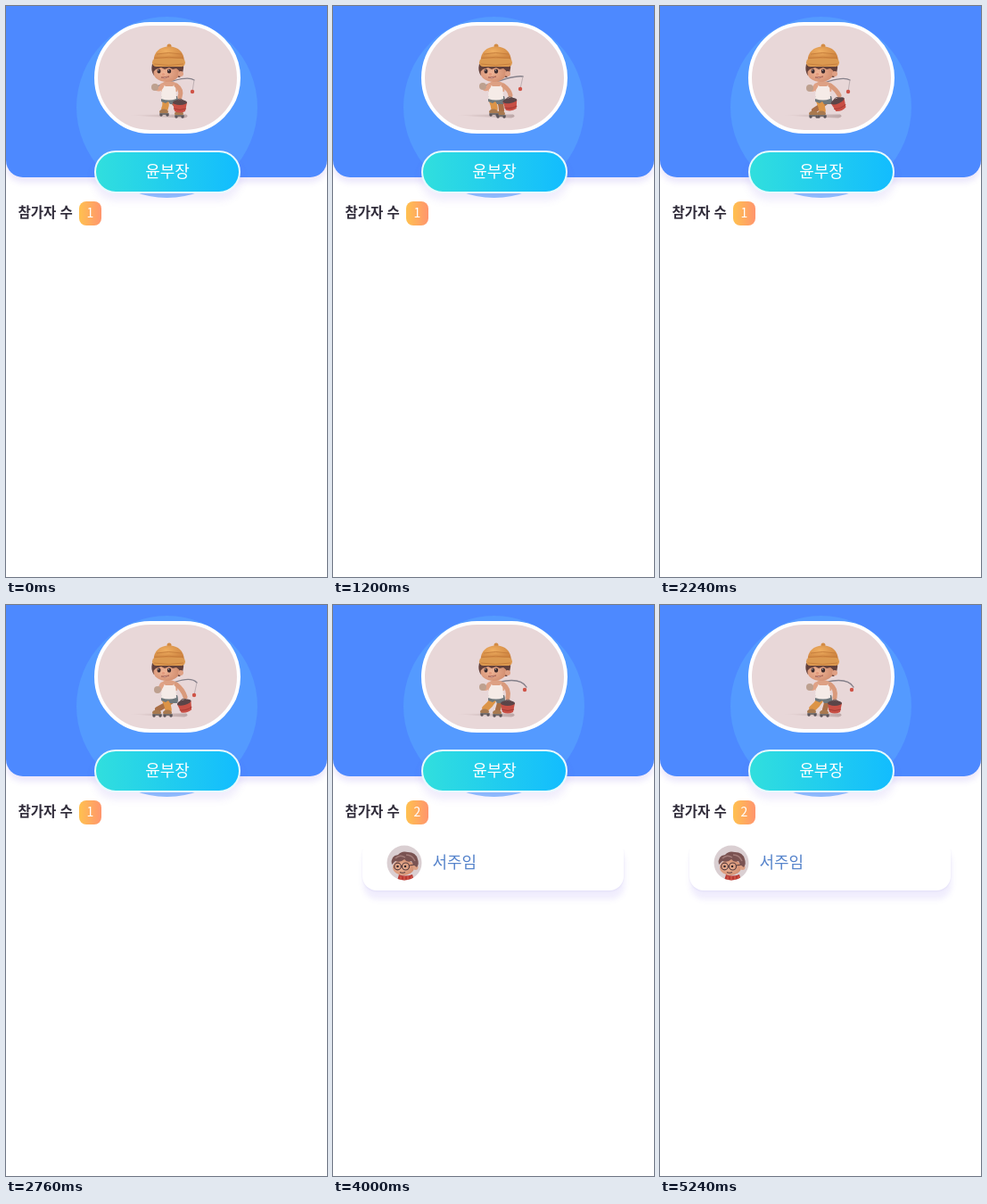
Write an HTML page that moves like this. It is 360x640 px and loops after 5280 ms.

```html
<!DOCTYPE html>
<html lang="ko">
<head>
<meta charset="utf-8">
<title>참가자 목록</title>
<style>
  html, body { margin: 0; width: 100%; height: 100%; overflow: hidden; background: #fff; }
  .stage {
    position: relative; width: 360px; height: 640px; overflow: hidden; background: #fff;
    font-family: "Noto Sans CJK KR", "Noto Sans CJK", "Noto Sans", sans-serif;
  }
  .stage > * { position: absolute; box-sizing: border-box; }
  .header {
    left: 0; top: -20px; width: 360px; height: 211.5px; border-radius: 0 0 19px 19px;
    background: #4d89ff; box-shadow: 0 6px 6px rgba(105, 80, 225, .13);
  }
  .disc { left: 79px; top: 12px; width: 203px; height: 203px; border-radius: 50%; background: rgba(88, 163, 255, .65); }
  .portrait {
    left: 99px; top: 18px; width: 164px; height: 125px; border: 4px solid #fff;
    border-radius: 62.5px; background: #e8d7d8;
  }
  .tag {
    left: 99px; top: 162px; width: 164px; height: 48px; border: 2px solid #e6fafd;
    border-radius: 24px; background: linear-gradient(90deg, #31dfdd, #12bcff) border-box;
    box-shadow: 0 7px 8px 1px rgba(105, 80, 225, .1);
  }
  .badge {
    left: 82px; top: 218.5px; width: 24.5px; height: 27.5px; border-radius: 8px;
    background: linear-gradient(90deg, #ffc150, #ff956d);
  }
  .card {
    left: 33px; top: 262px; width: 293px; height: 58px; border-radius: 16px; background: #fff;
    box-shadow: 0 1px 2px rgba(80, 70, 180, .08), 1px 10px 6px rgba(105, 80, 235, .1);
    clip-path: inset(12px -12px -24px -12px);
  }
  svg { left: 0; top: 0; }
</style>
</head>
<body>
<div class="stage">
  <div class="header"></div>
  <div class="disc"></div>
  <div class="portrait"></div>
  <div class="tag"></div>
  <div class="badge"></div>
  <div class="card guest"></div>

  <svg width="360" height="640" viewBox="0 0 360 640">
    <defs>
      <radialGradient id="wool" cx=".4" cy=".3" r=".75">
        <stop offset="0" stop-color="#efae60"/><stop offset="1" stop-color="#c97d3b"/>
      </radialGradient>
      <radialGradient id="skin" cx=".4" cy=".5" r=".65">
        <stop offset="0" stop-color="#efb597"/><stop offset="1" stop-color="#cf8a6c"/>
      </radialGradient>
      <linearGradient id="ground">
        <stop offset="0" stop-color="#b39a9a" stop-opacity="0"/><stop offset="1" stop-color="#8f7676" stop-opacity=".5"/>
      </linearGradient>
      <clipPath id="round"><circle cx="80" cy="289" r="19.5"/></clipPath>
      <g id="boot">
        <ellipse cx="-1" cy="-.5" rx="5" ry="3" fill="#a8794f"/>
        <rect x="-6" y="1" width="11" height="2" rx="1" fill="#77706f"/>
        <circle cx="-4" cy="3.2" r="1.5" fill="#5b545a"/>
        <circle cx="3" cy="3.2" r="1.5" fill="#5b545a"/>
      </g>
    </defs>

    <!-- walking figure -->
    <path d="M137 122L202 121.500Q206 124 200 125.500L160 124Z" fill="url(#ground)"/>
    <g fill="none" stroke-linecap="round">
      <path id="rod" stroke="#85808a" stroke-width="1.3"/>
      <path id="line" stroke="#b3a5a9" stroke-width=".8"/>
      <path id="farLeg" stroke="#a96e46" stroke-width="6"/>
    </g>
    <circle id="ball" r="2.2" fill="#cf5347"/>
    <use href="#boot" id="farBoot"/>
    <path id="nearLeg" fill="none" stroke="#dc9447" stroke-width="7.500" stroke-linecap="round"/>
    <use href="#boot" id="nearBoot"/>
    <path d="M174 101H192Q194 106 192 110L184 110 182 107 179 109 174 107Z" fill="#6f787c"/>
    <path d="M173 89Q176 84 183 84Q190 84 193 90L192 96H174Z" fill="#dda083"/>
    <path d="M175 87L179 90H187L190 87 191 104Q183 107 174 104Z" fill="#f5ebe7"/>
    <path id="farArm" fill="none" stroke="#d99a7c" stroke-width="5" stroke-linecap="round"/>
    <g id="bucket">
      <path d="M-6 -4Q0 -14 6 -4" fill="none" stroke="#6c5754" stroke-width="1"/>
      <path d="M-8 -5H8L6 5Q0 8 -6 5Z" fill="#c84f45"/>
      <path d="M-7 2Q0 5 7 2" fill="none" stroke="#a73a34" stroke-width="1"/>
      <ellipse cy="-5" rx="8" ry="3" fill="#5a4548"/>
    </g>

    <path d="M164 65Q162 73 166 78L195 80Q200 74 199 64Z" fill="#62403b"/>
    <ellipse cx="180" cy="75" rx="14.500" ry="10" fill="url(#skin)"/>
    <circle cx="196" cy="76" r="3" fill="#dfa084"/>
    <path d="M165 66Q181 64 199 67L195 73 191 70 187 71 183 69 178 71 174 69 168 71 166 73Z" fill="#62403b"/>
    <g fill="#38282b">
      <ellipse cx="171.500" cy="73" rx="2" ry="2.600"/><ellipse cx="183" cy="73" rx="2.200" ry="2.600"/>
    </g>
    <circle cx="171" cy="72" r=".6" fill="#fff"/><circle cx="182.500" cy="72" r=".6" fill="#fff"/>
    <circle cx="176.500" cy="76.500" r="1.600" fill="#e39a7d"/>
    <path d="M174 80Q178 82.500 183 79Z" fill="#f6e6df" stroke="#a55c4d" stroke-width=".8"/>
    <circle cx="183" cy="45" r="2.500" fill="#d38b44"/>
    <path d="M165.500 62Q166 46 183 45.500Q199 46 200 62Z" fill="url(#wool)"/>
    <rect x="164" y="59" width="37" height="9" rx="4.500" fill="#dc9950"/>
    <path d="M166 65Q182 68 199 65M169 54Q182 51 197 54M167 58.500Q182 56 199 58.500" fill="none" stroke="#c47c3c" stroke-width=".9"/>
    <path id="nearArm" fill="none" stroke="#e0a286" stroke-width="5" stroke-linecap="round"/>
    <circle id="hand" r="4" fill="#bda08f"/>

    <!-- small portrait -->
    <g class="guest">
      <g clip-path="url(#round)">
        <path d="M60 269H100V309H60Z" fill="#dacfd2"/>
        <path d="M72 309L74 302Q81 305 89 302L91 309Z" fill="#b93a35"/>
        <path d="M76 304V309M80 304V309M84 304V309M88 304V309" stroke="#e06a55" stroke-width="1"/>
        <ellipse cx="79" cy="294" rx="12" ry="9" fill="url(#skin)"/>
        <circle cx="92.500" cy="294" r="3" fill="#dca084"/>
        <path d="M66 291Q64 281 73 280Q77 275 84 277Q93 277 95 285Q97 290 94 294L90 291 88 287Q83 289 80 285Q76 289 70 287Z" fill="#7a5352"/>
        <path d="M70 284Q75 279 81 283M82 280Q89 280 92 287" fill="none" stroke="#a37c79" stroke-width="1.500"/>
        <g fill="none" stroke="#5a3f40" stroke-width="1.200">
          <circle cx="72.500" cy="293" r="3.800"/><circle cx="81.500" cy="293" r="4"/>
          <path d="M76 293H78M85.500 292L91 291M75 299.500Q78 301 81 299.500"/>
        </g>
        <circle cx="72.500" cy="293" r="1.300" fill="#38282b"/><circle cx="81" cy="293" r="1.300" fill="#38282b"/>
      </g>
      <text x="111.500" y="295" font-size="18" fill="#5583cb">서주임</text>
    </g>

    <text x="181" y="191.500" font-size="18" fill="#fff" text-anchor="middle">윤부장</text>
    <text x="13.500" y="237" font-size="15.500" font-weight="700" fill="#302c3a">참가자 수</text>
    <text id="count" x="94.500" y="237" font-size="14" fill="#fff" text-anchor="middle">1</text>
  </svg>
</div>

<script>
  const LOOP = 5280, STEP = 40, WALK = 1240, JOIN = 2800;
  const $ = id => document.getElementById(id);
  const guests = document.querySelectorAll('.guest');

  // bucket x, y, tilt; rod tip; ball; hand; near foot; far foot
  const pose = {
    stride: [195, 113, 0, 211, 83, 209, 96, 167, 91, 178, 119, 195, 121],
    low:    [196, 115, 0, 217, 92, 215, 95, 168, 92, 171, 120, 185, 121],
    lean:   [201, 114, -15, 214, 87, 211, 101, 170, 95, 182, 121, 170, 121],
    swap:   [194, 114, 0, 213, 88, 211, 100, 168, 93, 187, 118, 174, 121],
    pass:   [201, 111, -22, 213, 83, 211, 96, 168, 92, 182, 121, 173, 121],
    high:   [199, 111, -8, 213, 79, 210, 93, 168, 90, 181, 119, 189, 121]
  };

  function poseAt(t) {
    const lap = Math.floor(t / WALK), p = t % WALK;
    const keys = [
      [0, pose.stride], [280, lap === 2 ? pose.lean : pose.low], [640, pose.swap],
      [1000, pose.pass], [1040, pose.high], [1200, pose.high], [WALK, pose.stride]
    ];
    const i = keys.findIndex(k => p < k[0]);
    const [t0, a] = keys[i - 1], [t1, b] = keys[i];
    const mix = (p - t0) / (t1 - t0);
    return a.map((v, n) => v + (b[n] - v) * mix);
  }

  const path = (id, d) => $(id).setAttribute('d', d);
  const place = (id, x, y, turn = 0) =>
    $(id).setAttribute('transform', `translate(${x} ${y}) rotate(${turn})`);

  function draw(t) {
    const [bx, by, tilt, tx, ty, lx, ly, hx, hy, nx, ny, fx, fy] = poseAt(t);
    path('rod', `M${hx} ${hy}Q${tx - 9} 77 ${tx} ${ty}`);
    path('line', `M${tx} ${ty}L${lx} ${ly}`);
    path('farLeg', `M187 107Q${(187 + fx) / 2 + 1} 112 ${fx} ${fy - 4}`);
    path('nearLeg', `M179 107Q${(179 + nx) / 2 + 1} 112 ${nx} ${ny - 4}`);
    path('farArm', `M191 89Q198 94 ${bx} ${by - 11}`);
    path('nearArm', `M175 89Q172 96 ${hx} ${hy}`);
    place('ball', lx, ly);
    place('farBoot', fx, fy);
    place('nearBoot', nx, ny);
    place('bucket', bx, by, tilt);
    place('hand', hx, hy);

    const joined = t >= JOIN;
    guests.forEach(g => g.style.visibility = joined ? 'visible' : 'hidden');
    $('count').textContent = joined ? 2 : 1;
  }

  const start = performance.now();
  function tick() {
    const t = (performance.now() - start) % LOOP;
    draw(Math.floor(t / STEP) * STEP);
    requestAnimationFrame(tick);
  }
  tick();
</script>
</body>
</html>
```
